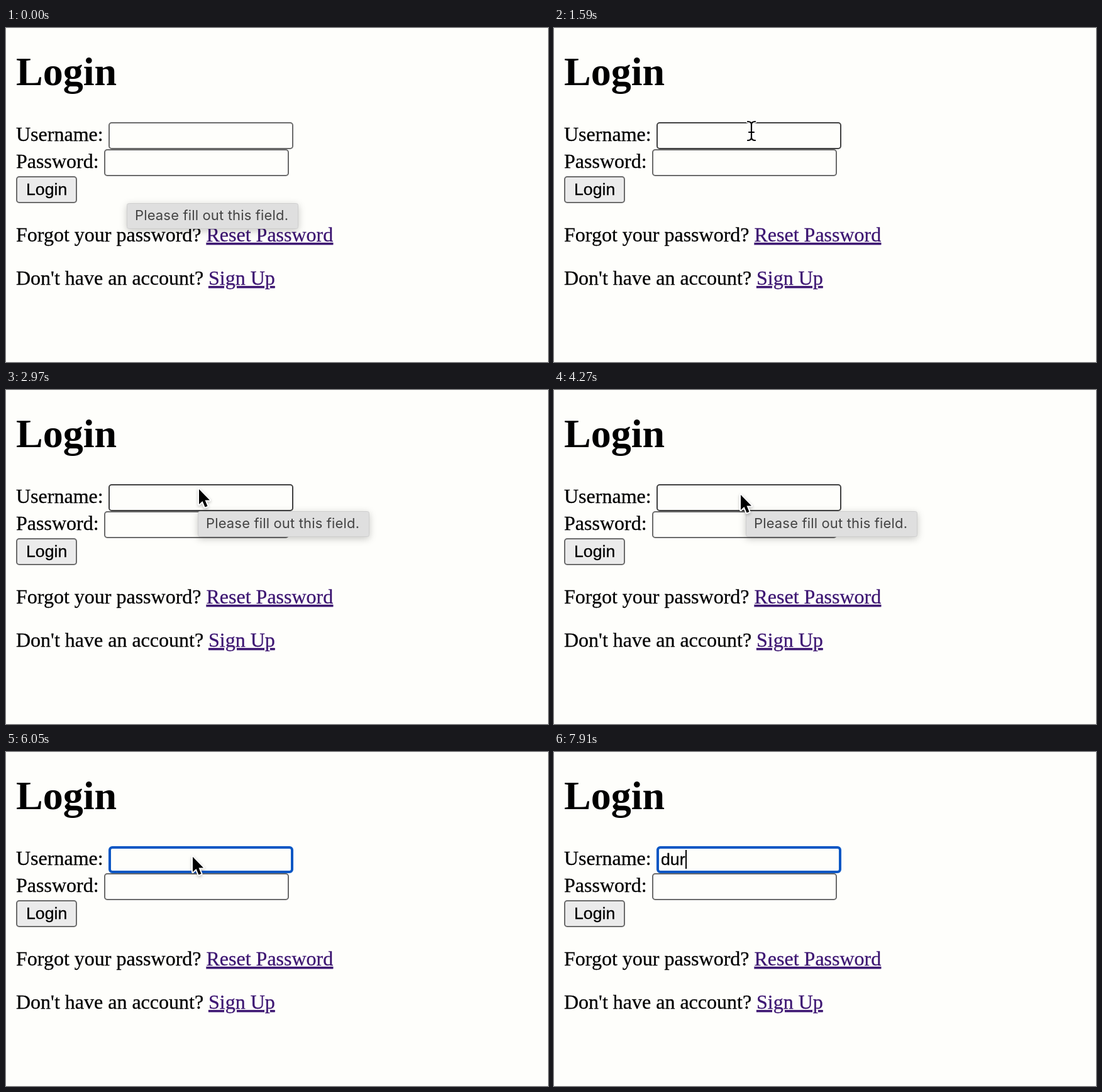
Write an HTML page that moves like this. It is 862 by 532 pixels and loops after 8 s.

```html
<!DOCTYPE html>
<html lang="en">
<head>
<meta charset="utf-8">
<title>Login</title>
<style>
  html, body { margin: 0; width: 100%; height: 100%; overflow: hidden; background: #fefefb; }
  svg { display: block; width: 862px; height: 532px; }
  text { white-space: pre; }
  .serif { font: 32px "Liberation Serif", "Times New Roman", serif; stroke: #000; stroke-width: .3; }
  .title { font: bold 64px "Liberation Serif", "Times New Roman", serif; }
  .sans { font: 26.667px "Liberation Sans", Arial, sans-serif; stroke: #000; stroke-width: .3; }
  .tip text { font: 22px Inter, sans-serif; letter-spacing: .15px; fill: #434343; }
  .tip rect { fill: #dfdfdf; stroke: #cecece; filter: drop-shadow(0 3px 6px rgba(0, 0, 0, .22)); }
  .link { fill: #3d1672; stroke: #3d1672; text-decoration: underline; text-decoration-thickness: 2px; }
  .field { fill: #fefefb; stroke: #6b6b6b; stroke-width: 2; }
  .hover { stroke: #414141; }
  .focus { x: 165px; y: 152px; width: 290px; height: 39px; stroke: #0b57c4; stroke-width: 4; }
</style>
</head>
<body>
<svg viewBox="0 0 862 532">
  <text class="title" x="16" y="91">Login</text>
  <text class="serif" x="16" y="180">Username:</text>
  <text class="serif" x="16" y="223">Password:</text>
  <rect class="field" x="157" y="194" width="292" height="41" rx="4"/>
  <rect id="user" class="field" x="164" y="151" width="292" height="41" rx="4"/>
  <text id="typed" class="sans" x="170" y="180"></text>
  <rect id="caret" x="171" y="156" width="2" height="30"/>
  <rect x="17" y="237" width="95" height="41" rx="4" fill="#ebebeb" stroke="#6b6b6b" stroke-width="2"/>
  <text class="sans" x="32" y="266">Login</text>
  <text class="serif" x="16" y="340">Forgot your password?</text>
  <text class="serif link" x="318.5" y="340">Reset Password</text>
  <text class="serif" x="16" y="409">Don't have an account?</text>
  <text class="serif link" x="322" y="409">Sign Up</text>

  <g id="tip" class="tip">
    <rect x=".5" y=".5" width="272" height="40" rx="3"/>
    <text x="13" y="27">Please fill out this field.</text>
  </g>

  <g id="arrow" style="filter: drop-shadow(0 2px 2px rgba(0, 0, 0, .25))">
    <path d="M1 2V26L6.5 21L10.5 30.5L14.5 29L10.5 19.5H18Z"
      stroke="#fff" stroke-width="4" stroke-linejoin="round" paint-order="stroke"/>
  </g>
  <g id="beam" fill="none" stroke-linecap="round">
    <path d="M-6 -15Q0 -15 0 -10Q0 -15 6 -15M0 -10V10M-6 15Q0 15 0 10Q0 15 6 15M-4 2H4" stroke="#fff" stroke-width="5"/>
    <path d="M-6 -15Q0 -15 0 -10Q0 -15 6 -15M0 -10V10M-6 15Q0 15 0 10Q0 15 6 15M-4 2H4" stroke="#000" stroke-width="2.2"/>
  </g>
</svg>
<script>
const LOOP = 8000;
const ENTER = 330, TIP_ON = 2350, CLICK = 4800;

// time, x, y of the pointer's hot spot
const path = [
  [330, 643, 449], [630, 565, 355], [1170, 565, 355], [1560, 314, 164],
  [1700, 314, 164], [1870, 306, 156], [3700, 306, 156], [4000, 296, 165]
];
const keys = [[7030, "d"], [7300, "du"], [7560, "dur"]];
const blink = [[CLICK, 5560], [6060, 6560], [7030, LOOP]];

const el = id => document.getElementById(id);
const [user, typed, caret, tip, arrow, beam] =
  ["user", "typed", "caret", "tip", "arrow", "beam"].map(el);
const clamp = v => Math.min(1, Math.max(0, v));
const ease = v => v * v * (3 - 2 * v);
const place = (node, x, y) => node.setAttribute("transform", `translate(${x} ${y})`);
const show = (node, on) => node.style.opacity = Number(on);

function pointer(t) {
  let [, x, y] = path[0];
  for (let i = 1; i < path.length; i++) {
    const [start] = path[i - 1], [end, nx, ny] = path[i];
    const k = ease(clamp((t - start) / (end - start)));
    x += (nx - x) * k;
    y += (ny - y) * k;
  }
  return [x, y];
}

function draw(t) {
  const [x, y] = pointer(t);
  const inside = x > 163 && x < 457 && y > 150 && y < 193;
  const visible = t >= ENTER && t < keys[0][0];
  const isBeam = inside && t < TIP_ON;
  place(arrow, x, y);
  place(beam, x, y);
  show(arrow, visible && !isBeam);
  show(beam, visible && isBeam);

  const late = t >= TIP_ON;
  place(tip, late ? 305 : 192, late ? 193 : 279);
  show(tip, late ? t < CLICK : 1 - clamp((t - 20) / 170));

  const focused = t >= CLICK;
  user.setAttribute("class", "field" + (focused ? " focus" : inside ? " hover" : ""));
  const text = keys.reduce((s, [at, value]) => t >= at ? value : s, "");
  if (typed.textContent !== text) typed.textContent = text;
  caret.setAttribute("x", text ? 170.5 + typed.getComputedTextLength() : 171);
  show(caret, blink.some(([on, off]) => t >= on && t < off));
}

const began = performance.now();
function tick() {
  draw((performance.now() - began) % LOOP);
  requestAnimationFrame(tick);
}
tick();
</script>
</body>
</html>
```
